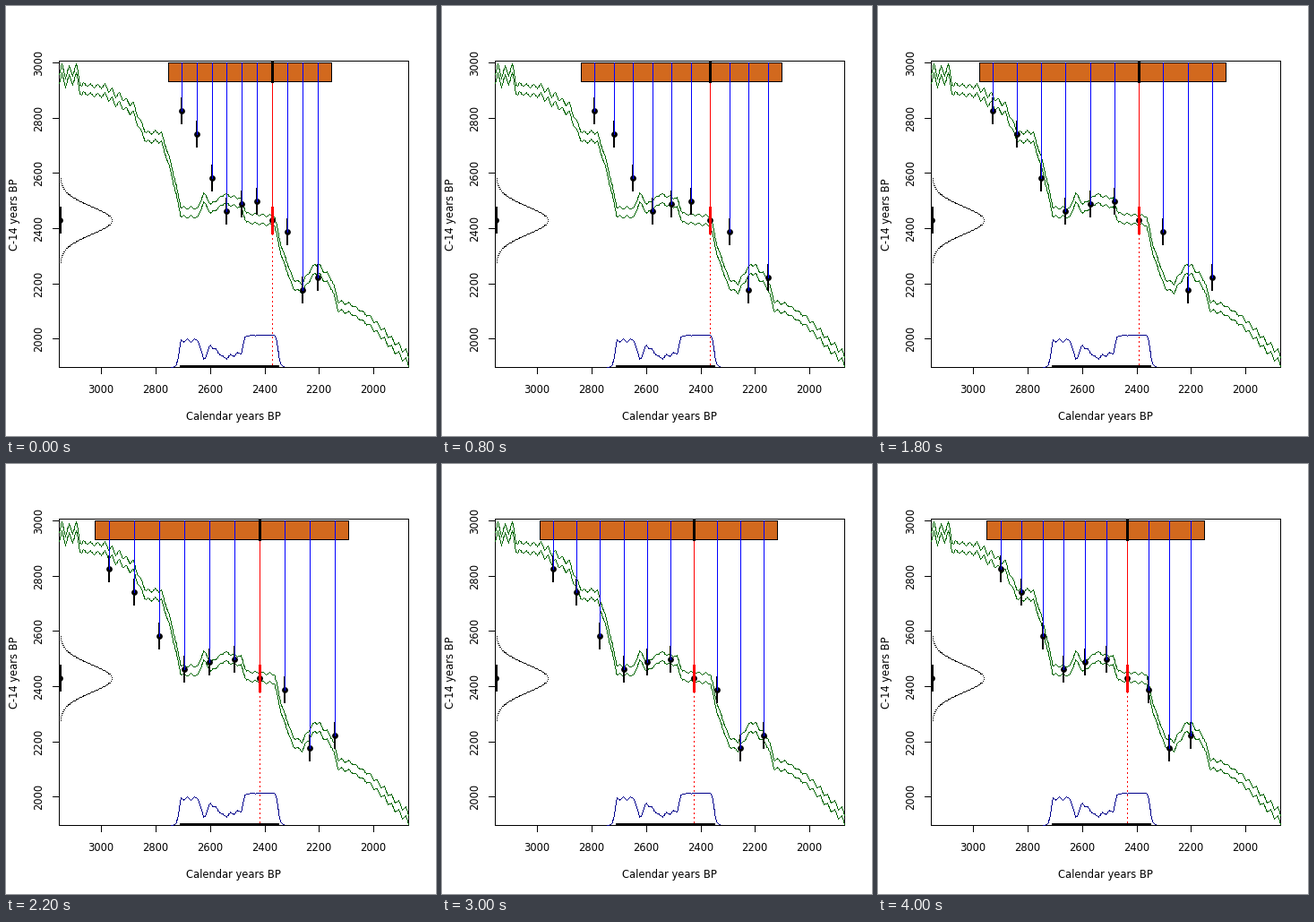
A matplotlib script for the animation above (5100 ms loop, 480x480 px).

```python
import matplotlib.pyplot as plt
import numpy as np
from matplotlib.animation import FuncAnimation
from matplotlib.colors import to_rgba
from matplotlib.patches import Circle, Rectangle

SIZE, DPI = 480, 96
PX = 72 / DPI                      # one pixel in points
LEFT, RIGHT, TOP, BOTTOM = 59, 449, 61, 403
MOVES, FRAMES, INTERVAL = 40, 51, 100
ANCHOR = 6                         # index of the highlighted date
BAR_PAD = 15.2
AGE, SIGMA = 239, 15.5             # highlighted measurement, in pixels

fig = plt.figure(figsize=(SIZE / DPI, SIZE / DPI), dpi=DPI, facecolor="white")
ax = fig.add_axes([0, 0, 1, 1])
ax.axis("off")
canvas = np.zeros((SIZE, SIZE, 4))


def trace(x, y, color):
    """Draw a crisp one-pixel polyline on the static canvas."""
    points = np.column_stack([x, y])
    for a, b in zip(points, points[1:]):
        n = max(1, int(np.ceil(np.abs(b - a).max())))
        px, py = np.rint(np.linspace(a, b, n + 1)).astype(int).T
        inside = (py >= TOP) & (py <= BOTTOM)
        canvas[py[inside], px[inside]] = to_rgba(color)


def stroke(x, y, color="black", width=1, z=3, **kw):
    return ax.plot(x, y, color=color, lw=width * PX, zorder=z, antialiased=False,
                   solid_capstyle="butt", **kw)[0]


def dot(x, y):
    return ax.add_patch(Circle((x + 0.5, y + 0.5), 3.4, color="black", lw=0, zorder=5))


def label(x, y, text, rotation=0):
    ax.text(x, y, text, family="DejaVu Sans", size=11.5 * PX, ha="center",
            va="baseline", rotation=rotation, rotation_mode="anchor")


# Axes
ax.add_patch(Rectangle((LEFT, TOP), RIGHT - LEFT, BOTTOM - TOP, fill=False,
                       lw=PX, zorder=2, antialiased=False))
for k in range(6):
    x, y = round(106.3 + 60.75 * k), round(63 + 61.65 * k)
    text = str(3000 - 200 * k)
    stroke([x, x], [BOTTOM, BOTTOM + 7])
    stroke([LEFT - 7, LEFT], [y, y])
    label(x, 431.5, text)
    label(40.5, y, text, 90)
label(253.5, 462, "Calendar years BP")
label(13.5, 233, "C-14 years BP", 90)

# Calibration band: a coarse trend with seeded zigzags, wilder at both ends
trend_x, trend_y = np.array([
    (59, 76), (79, 75), (84, 92), (112, 95), (134, 111), (141, 114), (156, 146),
    (173, 146), (184, 181), (195, 230), (214, 230), (220, 213), (228, 226), (243, 215),
    (262, 219), (268, 236), (299, 239), (307, 273), (320, 310), (330, 314), (345, 291),
    (362, 308), (371, 335), (385, 338), (405, 351), (449, 394)]).T
rng = np.random.default_rng(4)
knots = np.arange(LEFT - 1, RIGHT + 4, 4)
swing = np.interp(knots, [80, 90, 120, 180, 330, 350, 400, 415],
                  [10, 2, 5, 2, 2, 4, 2, 5])
zigzag = swing * rng.uniform(0.4, 1, knots.size) * (-1) ** np.arange(knots.size)
band_x = np.arange(LEFT, RIGHT + 1)
middle = np.interp(band_x, trend_x, trend_y) + np.interp(band_x, knots, zigzag)
for offset in (-5, 5):
    trace(band_x, middle + offset, "darkgreen")

# Measured age on the left, and its probability read off the band below
bell_y = np.arange(AGE - 3 * SIGMA, AGE + 3 * SIGMA + 1)
trace(LEFT + 1 + 58 * np.exp(-((bell_y - AGE) / SIGMA) ** 2 / 2), bell_y, "black")
density = 36 * np.exp(-((middle - AGE) / SIGMA) ** 2 / 2)
span = (band_x >= 184) & (band_x <= 310)
trace(band_x[span], BOTTOM - density[span], "darkblue")
stroke([194, 304], [402, 402], width=3)
stroke([61, 61], [224, 254], width=2)
dot(LEFT + 1, AGE).set_clip_path(
    Rectangle((LEFT, TOP), RIGHT - LEFT, BOTTOM - TOP, transform=ax.transData))
ax.imshow(canvas, extent=(0, SIZE, SIZE, 0), interpolation="nearest", aspect="auto",
          zorder=2.5)
ax.set_xlim(0, SIZE)
ax.set_ylim(SIZE, 0)

# Moving parts
date_y = [117, 143, 192, 229, 221, 218, AGE, 252, 317, 303]
bar = ax.add_patch(Rectangle((0, 63), 1, 21, fc="chocolate", ec="black", lw=PX,
                             zorder=4, antialiased=False))
marker = stroke([0, 0], [62, 85], width=3, z=7)
dotted = stroke([0, 0], [AGE, BOTTOM], "red", linestyle=(0, (1, 3)),
                dash_capstyle="butt", snap=False)
dots = [dot(0, y) for y in date_y]
errors, drops = [], []
for i, y in enumerate(date_y):
    main = i == ANCHOR
    errors.append(stroke([0, 0], [y - 15, y + 15], "red" if main else "black",
                         3 if main else 2, z=6))
    drops.append(stroke([0, 0], [63, y], "red" if main else "blue", z=6.5))


def pose(step):
    """Anchor position and spacing between dates: stretch, slide, then settle."""
    keys = [0, 15, 20, 21, MOVES]
    anchor = np.interp(step, keys, [297.5, 301.5, 285, 283.7, 278.7])
    spacing = np.interp(step, keys, [16.87, 25.47, 28.36, 28.31, 23.615])
    return anchor, spacing


def update(frame):
    anchor, spacing = pose(min(frame, MOVES))
    dates = anchor + spacing * (np.arange(len(date_y)) - ANCHOR)
    left, right = np.floor([dates[0] - BAR_PAD, dates[-1] + BAR_PAD])
    bar.set_x(left)
    bar.set_width(right - left)
    columns = np.floor(dates)
    for x, circle, error, drop in zip(columns, dots, errors, drops):
        circle.center = (x + 0.5, circle.center[1])
        error.set_xdata([x, x])
        drop.set_xdata([x, x])
    marker.set_xdata([columns[ANCHOR]] * 2)
    dotted.set_xdata([columns[ANCHOR] + 0.5] * 2)
    return [bar, marker, dotted, *dots, *errors, *drops]


anim = FuncAnimation(fig, update, frames=FRAMES, interval=INTERVAL,
                     repeat=True, repeat_delay=0, blit=False)
plt.show()
```
